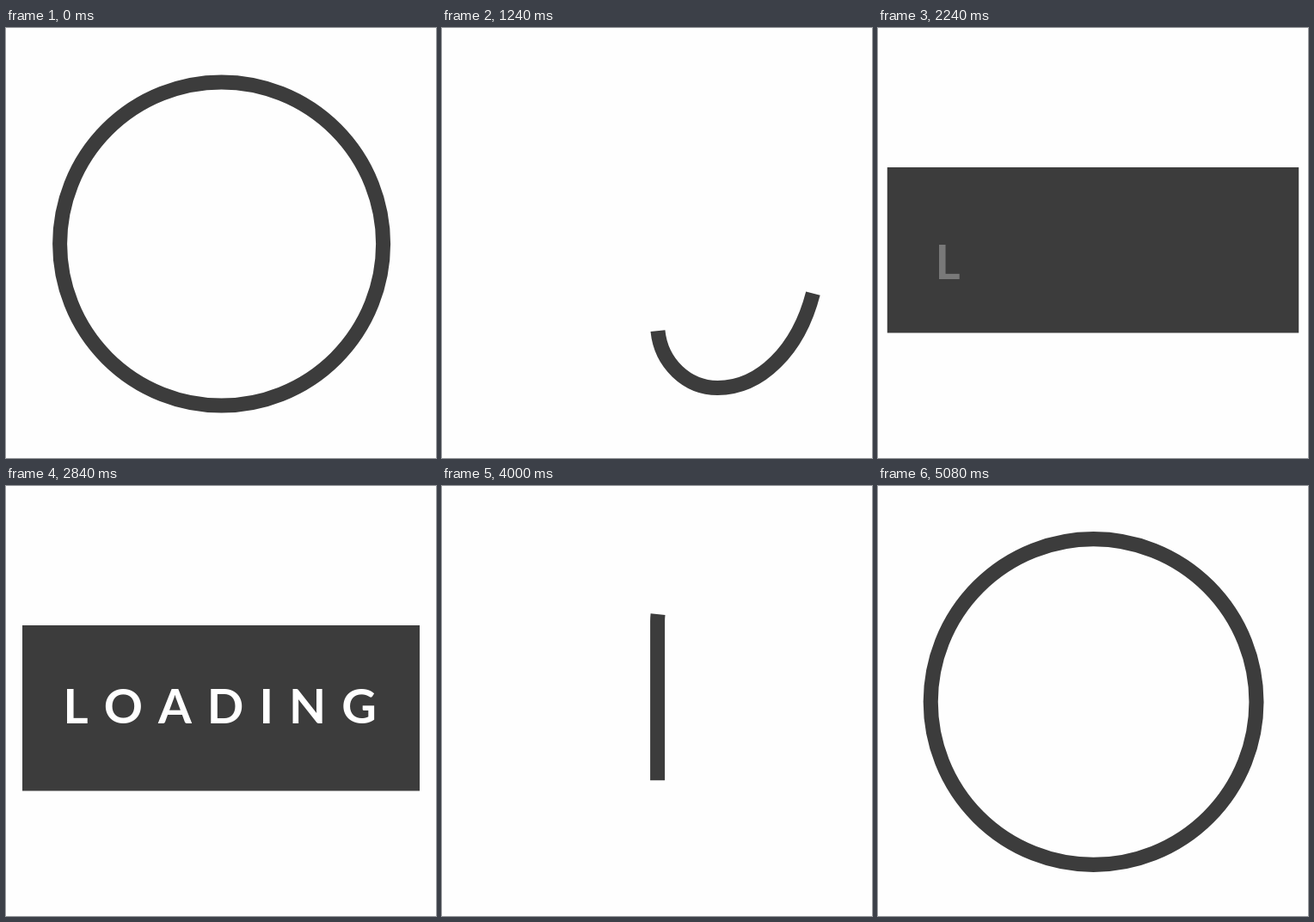
Animation of 500x500 px, one loop 5.12 s. Source, as an HTML page with a canvas:

```html
<!DOCTYPE html>
<html lang="en">
<head>
<meta charset="utf-8">
<title>Loading</title>
<style>
  html, body { margin: 0; width: 100%; height: 100%; overflow: hidden; background: #fefefe; }
  canvas { display: block; }
</style>
</head>
<body>
<canvas id="stage" width="500" height="500"></canvas>
<script>
const ctx = document.getElementById('stage').getContext('2d');
const LOOP = 5120, DARK = '#3c3c3c', WORD = 'LOADING';
const CX = 250.6, CY = 251, R = 188, STROKE = 17;
const TURN = 2 * Math.PI * R;
const BEND = { x: 320.5, drop: 167.5, start: 93.5 };   // bend between ring and bar, from CY
const HOOK = 338.5;                                    // its length
const BAR = { top: 162, bottom: 354.5, width: 462 };
const FONT = 'bold 56px Lato, sans-serif', GAP = 18;

const clamp = v => Math.min(1, Math.max(0, v));
const phase = (t, start, length) => clamp((t - start) / length);
const mix = (a, b, u) => a + (b - a) * u;
const inOutCubic = u => u < .5 ? 4 * u ** 3 : 1 - 4 * (1 - u) ** 3;
const outQuart = u => 1 - (1 - u) ** 4;
const outBack = u => 1 + 2 * (u - 1) ** 3 + (u - 1) ** 2;

// Smooth curve through [time, value] keys, at rest at both ends
function track(t, keys) {
  const last = keys.length - 1;
  if (t <= keys[0][0]) return keys[0][1];
  if (t >= keys[last][0]) return keys[last][1];
  const i = keys.findIndex(k => k[0] > t) - 1;
  const slope = j => j === 0 || j === last ? 0
    : (keys[j + 1][1] - keys[j - 1][1]) / (keys[j + 1][0] - keys[j - 1][0]);
  const [t0, a] = keys[i], [t1, b] = keys[i + 1];
  const d = t1 - t0, u = (t - t0) / d, v = 1 - u;
  return a * (1 + 2 * u) * v * v + b * u * u * (3 - 2 * u)
    + d * u * v * (slope(i) * v - slope(i + 1) * u);
}

function addRing(path, turns) {
  for (let i = 0; i < turns; i++) path.arc(CX, CY, R, 0, 2 * Math.PI);
}

const wide = CX + R - BEND.x, narrow = BEND.x - CX, low = BEND.drop - BEND.start;

const inward = new Path2D();
addRing(inward, 2);
inward.ellipse(BEND.x, CY, wide, BEND.drop, 0, 0, Math.PI / 2);
inward.ellipse(BEND.x, CY + BEND.start, narrow, low, 0, Math.PI / 2, Math.PI);
inward.lineTo(CX, 140);

const outward = new Path2D();
outward.moveTo(CX, BAR.bottom);
outward.lineTo(CX, CY - BEND.start);
outward.ellipse(BEND.x, CY - BEND.start, narrow, low, 0, Math.PI, 1.5 * Math.PI);
outward.ellipse(BEND.x, CY, wide, BEND.drop, 0, -Math.PI / 2, 0);
addRing(outward, 3);

function strokePart(path, tail, head) {
  ctx.lineWidth = STROKE;
  ctx.strokeStyle = DARK;
  ctx.setLineDash([head - tail + 1, 9999]);
  ctx.lineDashOffset = -tail;
  ctx.stroke(path);
}

function drawIntro(t) {
  const end = 2 * TURN + HOOK;
  const tail = track(t, [[120, 0], [680, TURN * 330 / 360], [1240, 2 * TURN + 55.5], [1640, end - 10]]);
  const head = track(t, [[120, TURN], [680, TURN * 435.5 / 360], [1240, end - 11], [1640, end + 182]]);
  strokePart(inward, tail, head);
}

function drawBar(t) {
  const open = outBack(phase(t, 1840, 600)), close = phase(t, 3720, 148) ** 2;
  const w = mix(mix(STROKE, BAR.width, open), STROKE, close);
  const x = mix(CX, 250, clamp(w / BAR.width));
  ctx.fillStyle = DARK;
  ctx.fillRect(x - w / 2, BAR.top, w, BAR.bottom - BAR.top);
}

function drawWord(t) {
  ctx.font = FONT;
  ctx.fillStyle = '#fff';
  const widths = [...WORD].map(c => ctx.measureText(c).width);
  let x = 248.7 - (widths.reduce((a, b) => a + b) + GAP * (WORD.length - 1)) / 2;
  [...WORD].forEach((c, i) => {
    const u = outQuart(phase(t, 2205 + 40 * i, 400));
    ctx.globalAlpha = u * (1 - phase(t, 3720, 100));
    ctx.fillText(c, x, 276 + 23 * (1 - u));
    x += widths[i] + GAP;
  });
  ctx.globalAlpha = 1;
}

function drawOutro(t) {
  const length = BAR.bottom - BAR.top, end = BAR.bottom - CY + BEND.start + HOOK;
  const tail = mix(0, end + TURN, inOutCubic(phase(t, 3868, 1100)));
  const head = mix(length, end + 2 * TURN, inOutCubic(phase(t, 3887, 1100)));
  const grow = 1 + .009 * Math.sin(Math.PI * phase(t, 4990, 130));
  ctx.save();
  ctx.translate(CX, CY);
  ctx.scale(grow, grow);
  ctx.translate(-CX, -CY);
  strokePart(outward, tail, head);
  ctx.restore();
}

function draw(now) {
  const t = now % LOOP;
  ctx.fillStyle = '#fefefe';
  ctx.fillRect(0, 0, 500, 500);
  if (t < 1640) drawIntro(t);
  else if (t < 3868) { drawBar(t); drawWord(t); }
  else drawOutro(t);
}

const start = performance.now();
function loop() {
  draw(performance.now() - start);
  requestAnimationFrame(loop);
}
loop();
</script>
</body>
</html>
```
